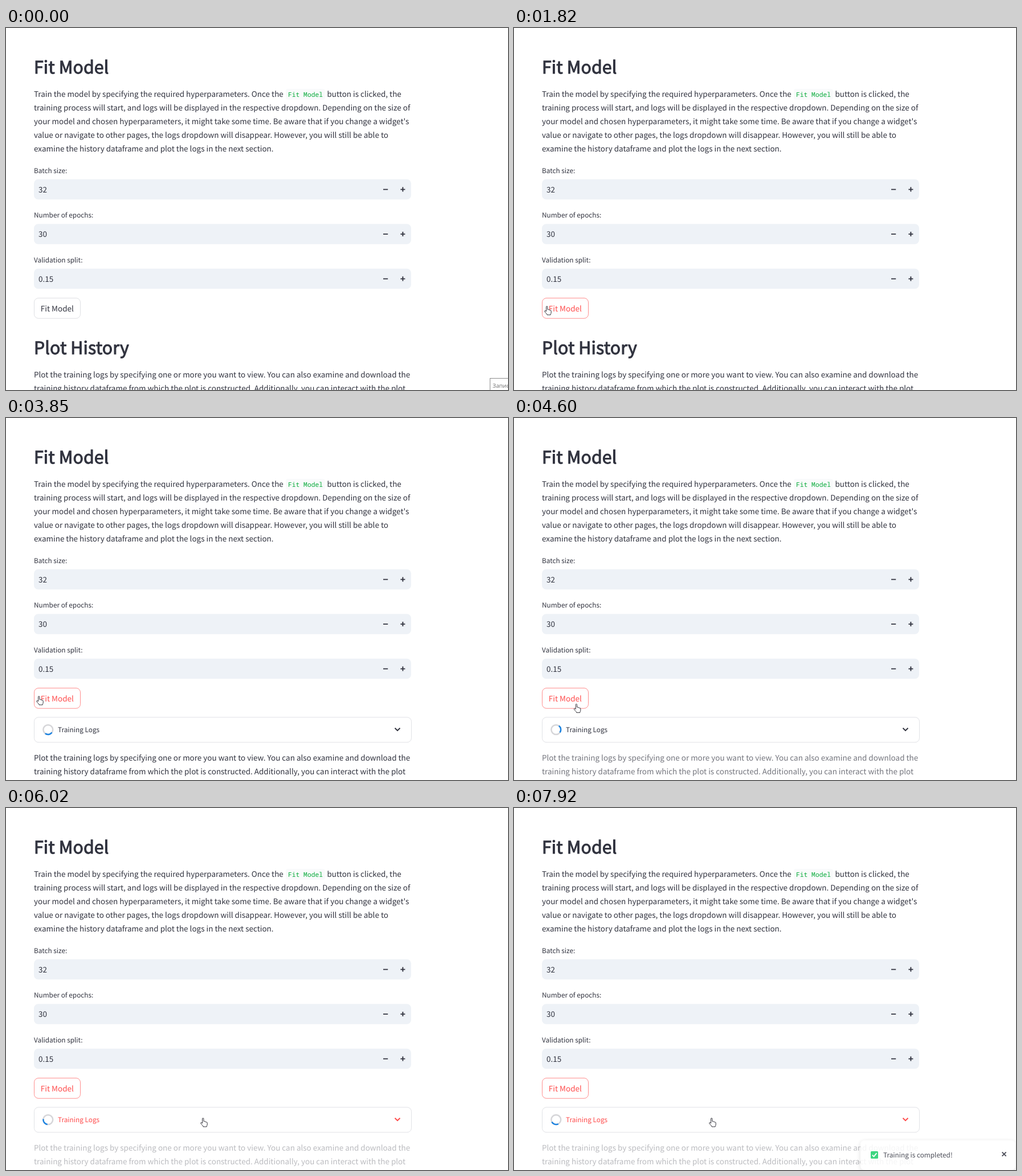
An HTML page that plays this animation: 881 px wide and 636 px high, repeating every 7990 ms.

```html
<!DOCTYPE html>
<html lang="en">
<head>
<meta charset="utf-8">
<title>Fit Model</title>
<style>
  html, body { margin: 0; width: 100%; height: 100%; overflow: hidden; background: #fff; }
  svg { display: block; }
  text {
    font: 13.48px "Noto Sans CJK JP", "Noto Sans CJK SC", "Noto Sans CJK KR", sans-serif;
    fill: #31333f; text-rendering: geometricPrecision; white-space: pre;
  }
  .title { font-size: 30.3px; letter-spacing: .12px; stroke: #31333f; stroke-width: 1.05px; }
  .small { font-size: 11.8px; }
  .code { font: 11.3px "Noto Sans Mono", monospace; fill: #09ab3b; }
  .tip { font: 10px "Noto Sans", sans-serif; fill: #777; }
  .frame { fill: #fff; stroke: #dfe0e4; }
  .icon { fill: none; stroke: #31333f; stroke-width: 1.9; }
  .hover .frame { stroke: #ff8f8f; }
  .hover text { fill: #ff4b4b; }
  .hover .icon { stroke: #ff4b4b; }
  #logs .frame { stroke: #e1e2e6; }
  .press .frame { fill: #ff4b4b; }
  .press text { fill: #fff; }
  .cursor { fill: #fff; stroke: #2b2b33; stroke-width: .95; stroke-linejoin: round; }
</style>
</head>
<body>
<svg width="881" height="636" viewBox="0 0 881 636">
  <defs>
    <filter id="shadow" x="-10%" y="-30%" width="120%" height="160%">
      <feDropShadow dx="0" dy="2" stdDeviation="4" flood-opacity=".14"/>
    </filter>
  </defs>

  <text class="title" x="49" y="80">Fit Model</text>
  <rect x="491" y="107" width="69" height="19" rx="4" fill="#f9fafb"/>
  <text x="49" y="120.5">Train the model by specifying the required hyperparameters. Once the</text>
  <text class="code" x="495" y="120.5">Fit Model</text>
  <text x="563.5" y="120.5">button is clicked, the</text>
  <text x="49" y="144.5">training process will start, and logs will be displayed in the respective dropdown. Depending on the size of</text>
  <text x="49" y="168.6">your model and chosen hyperparameters, it might take some time. Be aware that if you change a widget's</text>
  <text x="49" y="192.7">value or navigate to other pages, the logs dropdown will disappear. However, you will still be able to</text>
  <text x="49" y="216.8">examine the history dataframe and plot the logs in the next section.</text>
  <g id="fields"></g>

  <g id="button">
    <rect class="frame" x="49.5" y="474.5" width="81" height="35.7" rx="7.5"/>
    <text x="60.8" y="497.6">Fit Model</text>
  </g>

  <text class="title" id="heading" x="49" y="573">Plot History</text>
  <g id="logs">
    <rect class="frame" x="49.5" y="525.8" width="662" height="44" rx="7.5"/>
    <circle cx="73.8" cy="547.6" r="8.4" fill="none" stroke="#d6d6d9" stroke-width="2.5"/>
    <path id="arc" d="M5.94-5.94A8.4 8.4 0 0 1 5.94 5.94" fill="none" stroke="#1c83e1" stroke-width="2.5"/>
    <text class="small" x="91" y="552.3">Training Logs</text>
    <path class="icon" d="M682.5 544.7l4.5 4.4 4.5-4.4"/>
  </g>
  <g id="plot">
    <text x="49" y="613.5">Plot the training logs by specifying one or more you want to view. You can also examine and download the</text>
    <text x="49" y="637.6">training history dataframe from which the plot is constructed. Additionally, you can interact with the plot</text>
  </g>

  <g id="tip">
    <rect x="849.5" y="615.5" width="60" height="30" fill="#fff" stroke="#8c8c8c"/>
    <text class="tip" x="854" y="632">Запись</text>
  </g>

  <g id="toast">
    <rect x="608" y="584" width="272" height="52" rx="7.5" fill="#fff" filter="url(#shadow)"/>
    <rect x="626" y="603" width="13" height="13" rx="1.5" fill="#1fcf6d"/>
    <path d="M628.8 609.6l2.7 2.8 4.9-6" fill="none" stroke="#fff" stroke-width="1.8"/>
    <text class="small" x="648" y="614">Training is completed!</text>
    <path class="icon" d="M856.6 604.6l7 7m0-7l-7 7"/>
  </g>

  <path class="cursor" id="arrow" d="M.5.5V14.5L3.8 11.5 6 16.5 8 15.6 5.8 10.7H10.3z"/>
  <path class="cursor" id="hand" d="M3.6 10V2a1.15 1.15 0 0 1 2.3 0V6.4Q7.9 5.8 8.1 7.2 10 6.6 10.2 8 12.2 7.6 12.2 9.2V12Q12.2 13.6 11.2 14.8V16H5V14.8Q2.8 13 .9 10.2 .4 8.6 1.8 8.5 2.7 8.7 3.6 10z"/>
</svg>
<script>
  const LOOP = 7990;
  const $ = id => document.getElementById(id);
  const show = (id, opacity) => $(id).setAttribute("opacity", +opacity);
  const place = (id, x, y, angle = 0) =>
    $(id).setAttribute("transform", `translate(${x} ${y}) rotate(${angle})`);
  const ramp = (t, from, to) => Math.min(1, Math.max(0, (t - from) / (to - from)));

  const fields = [["Batch size:", "32"], ["Number of epochs:", "30"], ["Validation split:", "0.15"]];
  $("fields").innerHTML = fields.map(([label, value], i) => `
    <g transform="translate(0 ${i * 78.5})">
      <text class="small" x="49" y="254.5">${label}</text>
      <rect x="49" y="265.7" width="662" height="35.6" rx="7.5" fill="#eef2f7"/>
      <text x="57" y="288.9">${value}</text>
      <path class="icon" d="M662 283.6h8.2M692.4 283.6h8M696.4 279.6v8"/>
    </g>`).join("");

  // Pointer stops: time, x, y
  const stops = [
    [400, 884, 640], [470, 827, 622], [800, 420, 497], [1200, 14, 548],
    [1440, 405, 550], [1660, 90, 450], [1820, 53, 488], [3950, 53, 488],
    [4670, 106, 502], [5240, 271, 535], [5550, 271, 535], [5900, 341, 544],
    [7160, 341, 544], [7230, 342, 544]
  ];

  function pointer(t) {
    const i = stops.findIndex(s => s[0] > t);
    if (i < 1) return stops[i ? stops.length - 1 : 0].slice(1);
    const [t0, x0, y0] = stops[i - 1], [t1, x1, y1] = stops[i];
    const p = ramp(t, t0, t1), k = p * p * (3 - 2 * p);
    return [x0 + (x1 - x0) * k, y0 + (y1 - y0) * k];
  }

  function draw(t) {
    const open = t >= 3500, hand = t >= 1740;
    const pressed = t >= 3110 && t < 3250;

    show("tip", t < 70 ? 1 : t < 140 ? .5 : 0);
    $("button").setAttribute("class", (hand ? "hover" : "") + (pressed ? " press" : ""));
    show("heading", !open);
    show("logs", open);
    $("logs").setAttribute("class", t >= 5050 ? "hover" : "");
    place("arc", 73.8, 547.6, .36 * t + 135);

    place("plot", 0, open ? -11.1 : 0);
    show("plot", 1 - .67 * ramp(t, 3900, 5000) ** 1.6);
    show("toast", .86 * ramp(t, 7640, 7900));

    const [x, y] = pointer(t);
    place("arrow", x, y);
    place("hand", x, y);
    show("arrow", t >= 470 && !hand);
    show("hand", hand);
  }

  const start = performance.now();
  function tick() {
    draw((performance.now() - start) % LOOP);
    requestAnimationFrame(tick);
  }
  tick();
</script>
</body>
</html>
```
